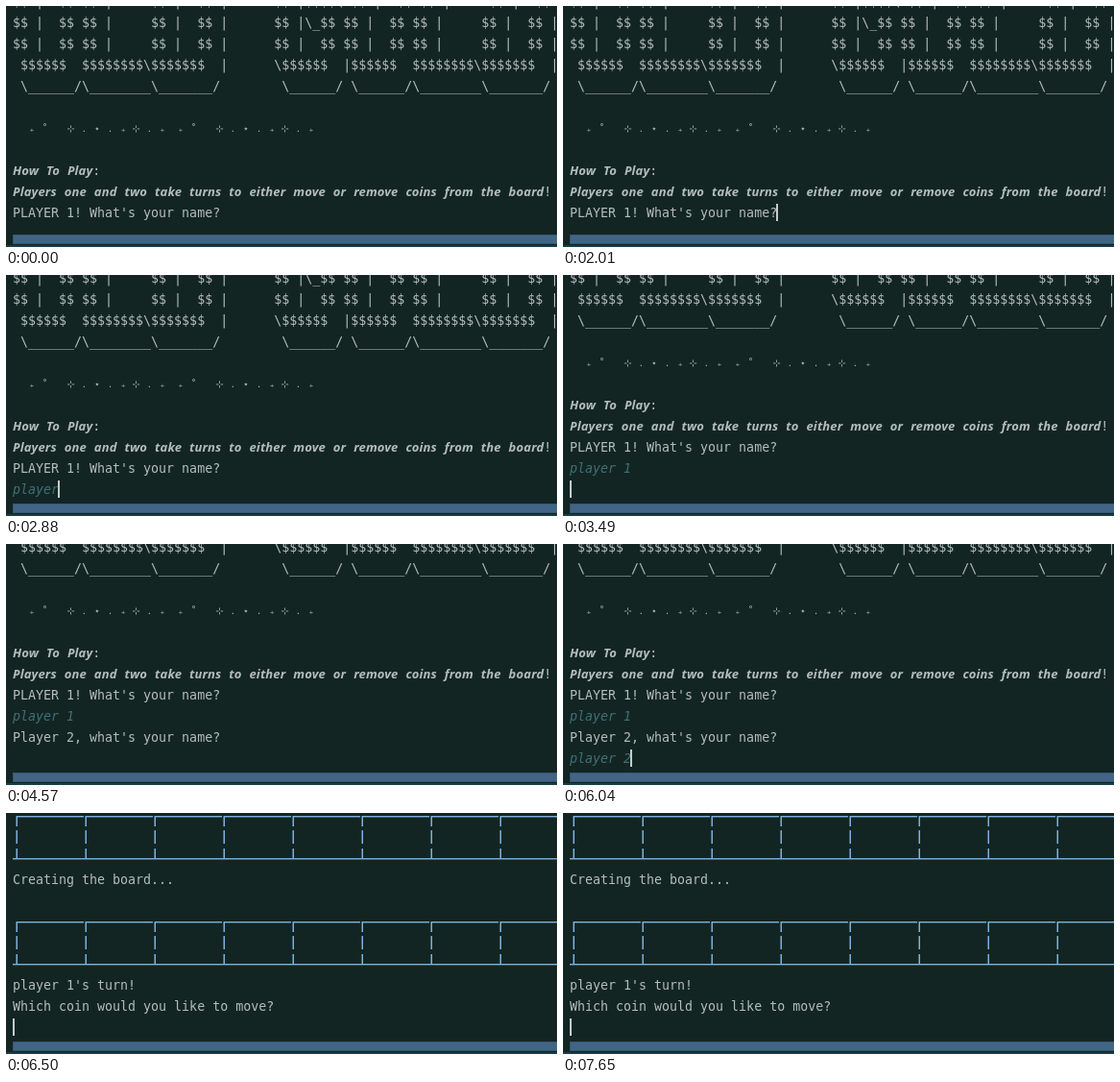
An HTML page with a canvas for the animation above (8000 ms loop, 574 px wide and 251 px high).

```html
<!DOCTYPE html>
<html lang="en">
<head>
<meta charset="utf-8">
<title>Coin game in a terminal</title>
<style>
html, body { margin: 0; width: 574px; height: 251px; overflow: hidden; background: #132523; }
canvas { display: block; }
</style>
</head>
<body>
<canvas id="stage" width="574" height="251"></canvas>
<script>
const ctx = document.getElementById('stage').getContext('2d');
const LOOP = 8000, LEFT = 7, ROW = 22, CHAR = 8, BLINK = 530;
const MONO = '13.3px "DejaVu Sans Mono", monospace';
const BOLD = 'italic bold 13px "Open Sans", "Noto Sans", sans-serif';
const SMALL = '10px "DejaVu Sans", sans-serif';
const BACK = '#132523', TEXT = '#b4bcbd', LINE = '#7cb2dc', INPUT = '#3f7076';

function write(text, x, y, color = TEXT, font = MONO) {
  ctx.font = font;
  ctx.fillStyle = color;
  ctx.fillText(text, x, y + 5);
}

function rect(x, y, w, h, color) {
  ctx.fillStyle = color;
  ctx.fillRect(x, y, w, h);
}

// Each helper returns a painter for one terminal line centred on y
const plain = text => y => write(text, LEFT, y);
const typed = text => y => write(text, LEFT, y, INPUT, 'italic ' + MONO);
const blank = () => {};

// Proportional bold text whose spaces are one terminal cell wide
const heading = (text, mark) => y => {
  ctx.letterSpacing = '0.15px';
  ctx.wordSpacing = '4.4px';
  write(text, LEFT, y, TEXT, BOLD);
  const end = LEFT + ctx.measureText(text).width;
  ctx.letterSpacing = ctx.wordSpacing = '0px';
  write(mark, end, y);
};

function sparkles(y) {
  ctx.textAlign = 'center';
  for (const x of [27, 182]) {
    [...'₊˚ ⊹.⋆.₊⊹.₊'].forEach((star, i) => write(star, x + i * 13.6, y - 1, TEXT, SMALL));
  }
  ctx.textAlign = 'left';
}

// A board takes three lines: corners, bars, base
const boardPart = (top, height, drawEdge) => y => {
  for (let x = 11; x < 574; x += 9 * CHAR) {
    rect(x - .5, y + top, 1.5, height, LINE);
    drawEdge(x, y);
  }
};
const board = [
  boardPart(0, 11, (x, y) => rect(x, y, 70, 1.4, LINE)),
  boardPart(-7, 14, blank),
  boardPart(-10, 11, (x, y) => rect(x - 4, y, 72, 1.4, LINE))
];

const lines = [
  plain('$$ |  $$ $$ |     $$ |  $$ |      $$ |$$$$\\ $$ |  $$ $$ |     $$ |  $$ |'),
  plain('$$ |  $$ $$ |     $$ |  $$ |      $$ |\\_$$ $$ |  $$ $$ |     $$ |  $$ |'),
  plain('$$ |  $$ $$ |     $$ |  $$ |      $$ |  $$ $$ |  $$ $$ |     $$ |  $$ |'),
  plain(' $$$$$$  $$$$$$$$\\$$$$$$$  |      \\$$$$$$  |$$$$$$  $$$$$$$$\\$$$$$$$  |'),
  plain(' \\______/\\________\\_______/        \\______/ \\______/\\________\\_______/'),
  blank,
  sparkles,
  blank,
  heading('How To Play', ':'),
  heading('Players one and two take turns to either move or remove coins from the board', '!'),
  plain("PLAYER 1! What's your name?"),
  typed('player 1'),
  plain("Player 2, what's your name?"),
  typed('player 2'),
  blank,
  plain("player 2's turn!"),
  blank,
  ...board,
  plain('Creating the board...'),
  blank,
  ...board,
  plain("player 1's turn!"),
  plain('Which coin would you like to move?')
];

// The last line reached, the caret column if any, when the caret first blinks off,
// and what is being typed at one key per gap
const stages = [
  { start: 0, row: 10, shown: 11 },
  { start: 1010, row: 10, shown: 11, col: 27, off: 1470 },
  { start: 2080, row: 11, input: 'player 1', gap: 160 },
  { start: 3490, row: 12, col: 0 },
  { start: 3690, row: 13, col: 0, off: 4570 },
  { start: 5300, row: 13, input: 'player 2', gap: 105 },
  { start: 6240, row: 14, col: 0 },
  { start: 6300, row: 16, col: 0 },
  { start: 6370, row: 21 },
  { start: 6450, row: 25 },
  { start: 6500, row: 27, col: 0, off: 7120 }
];

function drawCaret(col, y) {
  rect(Math.max(LEFT, LEFT - 1 + col * CHAR), y - 9, 2, 18, '#c4cccb');
}

function draw(time) {
  const { start, row, shown = row, col, off = LOOP, input, gap } =
    stages.findLast(stage => stage.start <= time);
  // The view follows the last line once it reaches the bottom
  const scroll = Math.max(0, row * ROW - 228);
  const rowY = i => i * ROW - 5 - scroll;

  rect(0, 0, 574, 251, BACK);
  lines.slice(0, shown).forEach((line, i) => line(rowY(i)));

  if (input) {
    const keys = Math.min(input.length, 1 + Math.floor((time - start) / gap));
    typed(input.slice(0, keys))(rowY(row));
    drawCaret(keys, rowY(row));
  } else if (col !== undefined && (time < off || Math.floor((time - off) / BLINK) % 2)) {
    drawCaret(col, rowY(row));
  }

  // Scrollbar and window edge
  rect(LEFT, 238, 567, 10, '#37566f');
  rect(LEFT + 1, 239, 566, 8, '#426587');
  rect(0, 248, 574, 3, BACK);
  rect(0, 249, 574, 2, '#173d44');
}

const begin = performance.now();
(function frame() {
  draw((performance.now() - begin) % LOOP);
  requestAnimationFrame(frame);
})();
</script>
</body>
</html>
```
